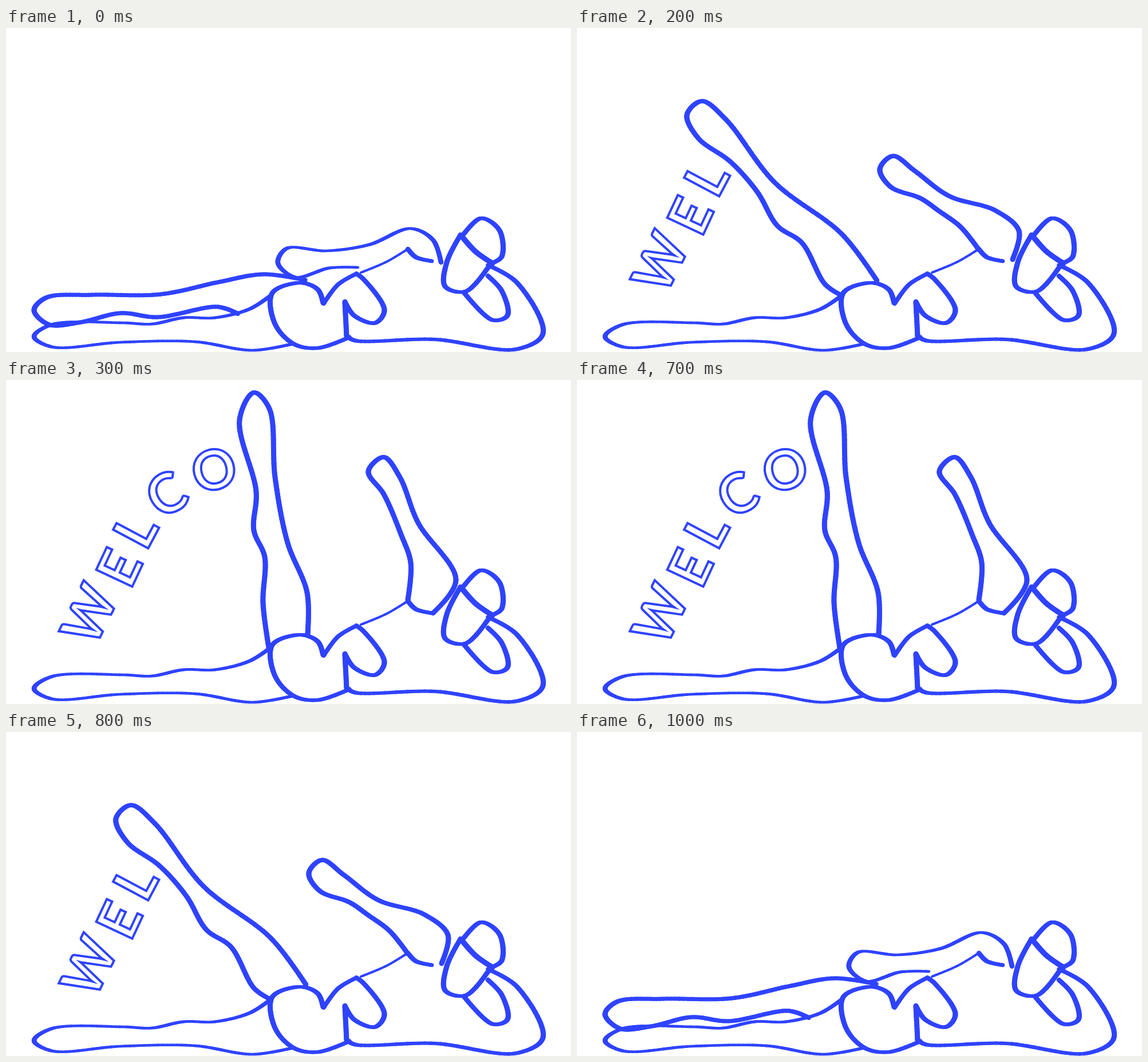
These frames come from a looping animation (987x567 px, 1100 ms). An HTML page with a canvas:

```html
<!DOCTYPE html>
<html lang="en">
<head>
<meta charset="utf-8">
<title>Welcome</title>
<style>
html, body { margin: 0; width: 100%; height: 100%; overflow: hidden; background: #fff; }
canvas { display: block; }
</style>
</head>
<body>
<canvas id="stage" width="987" height="567" aria-label="WELCOME!"></canvas>
<script>
const ctx = document.getElementById('stage').getContext('2d');
const BLUE = '#2f43ff';
const PEAK = 4;                  // pose where hand and foot meet
const SHOWN = [0, 1, 3, 5, 8];   // letters per pose
const rad = degrees => degrees * Math.PI / 180;

// Smooth brush line through x, y pairs; it swells where it runs vertically.
function brush(pts, width = 7, swell = 2) {
  const n = pts.length / 2;
  const at = (i, k) => pts[2 * Math.max(0, Math.min(n - 1, i)) + k];
  const step = i => Math.sqrt(Math.hypot(at(i + 1, 0) - at(i, 0), at(i + 1, 1) - at(i, 1))) || 1;
  const slope = (i, k) => {
    const a = step(i - 1), b = step(i);
    return ((at(i, k) - at(i - 1, k)) / a * b + (at(i + 1, k) - at(i, k)) / b * a) / (a + b);
  };
  const curve = (i, k, t) => {
    const h = step(i) / 3, u = 1 - t, p = at(i, k), q = at(i + 1, k);
    return u * u * u * p + 3 * u * u * t * (p + slope(i, k) * h)
      + 3 * u * t * t * (q - slope(i + 1, k) * h) + t * t * t * q;
  };
  let [x, y] = pts;
  for (let i = 0; i < n - 1; i++) {
    for (let t = 1 / 16; t <= 1; t += 1 / 16) {
      const nx = curve(i, 0, t), ny = curve(i, 1, t);
      ctx.lineWidth = width + swell * Math.abs(ny - y) / (Math.hypot(nx - x, ny - y) || 1);
      ctx.beginPath();
      ctx.moveTo(x, y);
      ctx.lineTo(nx, ny);
      ctx.stroke();
      [x, y] = [nx, ny];
    }
  }
}

// Swing a limb around a joint, keeping the points near the joint in place.
function swing(pts, cx, cy, degrees) {
  const out = [];
  for (let i = 0; i < pts.length; i += 2) {
    const x = pts[i] - cx, y = pts[i + 1] - cy;
    const a = rad(degrees) * Math.min(1, Math.max(0, Math.hypot(x, y) - 35) / 100);
    out.push(cx + x * Math.cos(a) - y * Math.sin(a), cy + x * Math.sin(a) + y * Math.cos(a));
  }
  return out;
}

const flatLeg = [523,441, 450,431, 370,445, 270,466, 150,467, 70,472, 49,494, 75,519, 130,515,
  200,499, 265,506, 370,488, 405,500];
const flatArm = [615,419, 565,420, 505,436, 475,411, 490,386, 560,390, 635,379, 707,351, 746,371, 760,410];

const lowLeg = [460,467, 433,448, 393,376, 350,346, 315,287, 268,234, 212,193, 192,152, 218,128,
  260,160, 345,270, 462,360, 524,442];
const lowArm = [702,388, 670,348, 632,320, 600,298, 548,278, 529,247, 552,224, 590,250, 650,294,
  730,319, 772,355, 761,405];

const highLeg = [459,468, 449,390, 452,310, 433,263, 437,195, 408,70, 433,22, 460,50, 470,170,
  492,285, 526,372, 527,445];
const highArm = [702,385, 707,320, 690,270, 660,200, 633,160, 660,135, 688,170, 720,250, 786,350, 746,408];

const peakLeg = [457,468, 545,355, 580,268, 635,198, 659,120, 672,82, 700,66, 726,88, 691,170,
  642,255, 615,350, 547,456];
const peakArm = [704,385, 722,320, 718,255, 694,158, 722,132, 745,160, 748,240, 785,350, 748,407];

const limbs = [
  [flatLeg, flatArm],
  [swing(lowLeg, 490, 455, -24), swing(lowArm, 738, 385, -20)],
  [lowLeg, lowArm],
  [highLeg, highArm],
  [peakLeg, peakArm]
];

function body(peak) {
  const line = pts => brush(pts, 6, peak ? 1 : 3);
  // lower leg
  brush([460,470, 425,492, 365,507, 310,507, 255,518, 205,516, 80,519, 49,540, 80,558, 200,550,
    330,549, 430,564, 500,553], peak ? 7 : 4.5, peak ? 0 : 4);
  // hip and waist
  line([554,481, 545,458, 515,446, 465,464, 470,518, 503,553, 545,560, 600,541]);
  // chest
  brush([555,482, 580,449, 612,430], peak ? 8 : 6);
  line([612,430, 625,440, 661,494, 645,516, 608,503, 592,479]);
  line([592,480, 595,539]);
  // back and supporting arm
  line([596,540, 610,547, 750,545, 892,562, 938,535, 893,446, 842,415]);
  line([842,434, 866,460, 876,503, 850,511, 800,463]);
  // shoulder
  brush([620,428, 665,409, 700,388], 4, 0);
  line([702,387, 716,401, 744,408]);
  // head
  line([794,362, 770,410, 767,452, 803,461, 843,418]);
  brush([795,363, 820,391, 850,412], peak ? 4 : 8);
  line([800,360, 830,333, 862,354, 866,400, 850,411]);
}

// letter, centre, rotation in degrees
const letters = [
  ['W', 145, 410, -64], ['E', 198, 327, -65], ['L', 227, 260, -62], ['C', 281, 199, -31],
  ['O', 363, 157, -15], ['M', 462, 130, 0], ['E', 553, 125, -3], ['!', 606, 122, 2]
];

function drawLetter([ch, x, y, angle]) {
  const m = ctx.measureText(ch);
  ctx.save();
  ctx.translate(x, y);
  ctx.rotate(rad(angle));
  ctx.strokeText(ch, (m.actualBoundingBoxLeft - m.actualBoundingBoxRight) / 2,
    (m.actualBoundingBoxAscent - m.actualBoundingBoxDescent) / 2);
  ctx.restore();
}

function draw(pose) {
  const peak = pose === PEAK;
  ctx.fillStyle = '#fff';
  ctx.fillRect(0, 0, 987, 567);
  ctx.strokeStyle = BLUE;
  ctx.lineCap = 'round';
  ctx.save();
  if (peak) ctx.translate(-1, -2);
  body(peak);
  ctx.font = 'bold 96px Lato, sans-serif';
  ctx.lineWidth = 4;
  letters.slice(0, SHOWN[pose]).forEach(drawLetter);
  ctx.restore();
  const [leg, arm] = limbs[pose];
  brush(leg);
  if (pose) brush(arm);
  else brush(arm, 4.5, 4);
}

// Rise one pose per 100 ms, hold the peak, then sink back.
let last = -1;
function frame() {
  const beat = Math.floor(performance.now() % 1100 / 100);
  const pose = Math.min(beat, PEAK, 10 - beat);
  if (pose !== last) draw(last = pose);
  requestAnimationFrame(frame);
}
frame();
</script>
</body>
</html>
```
